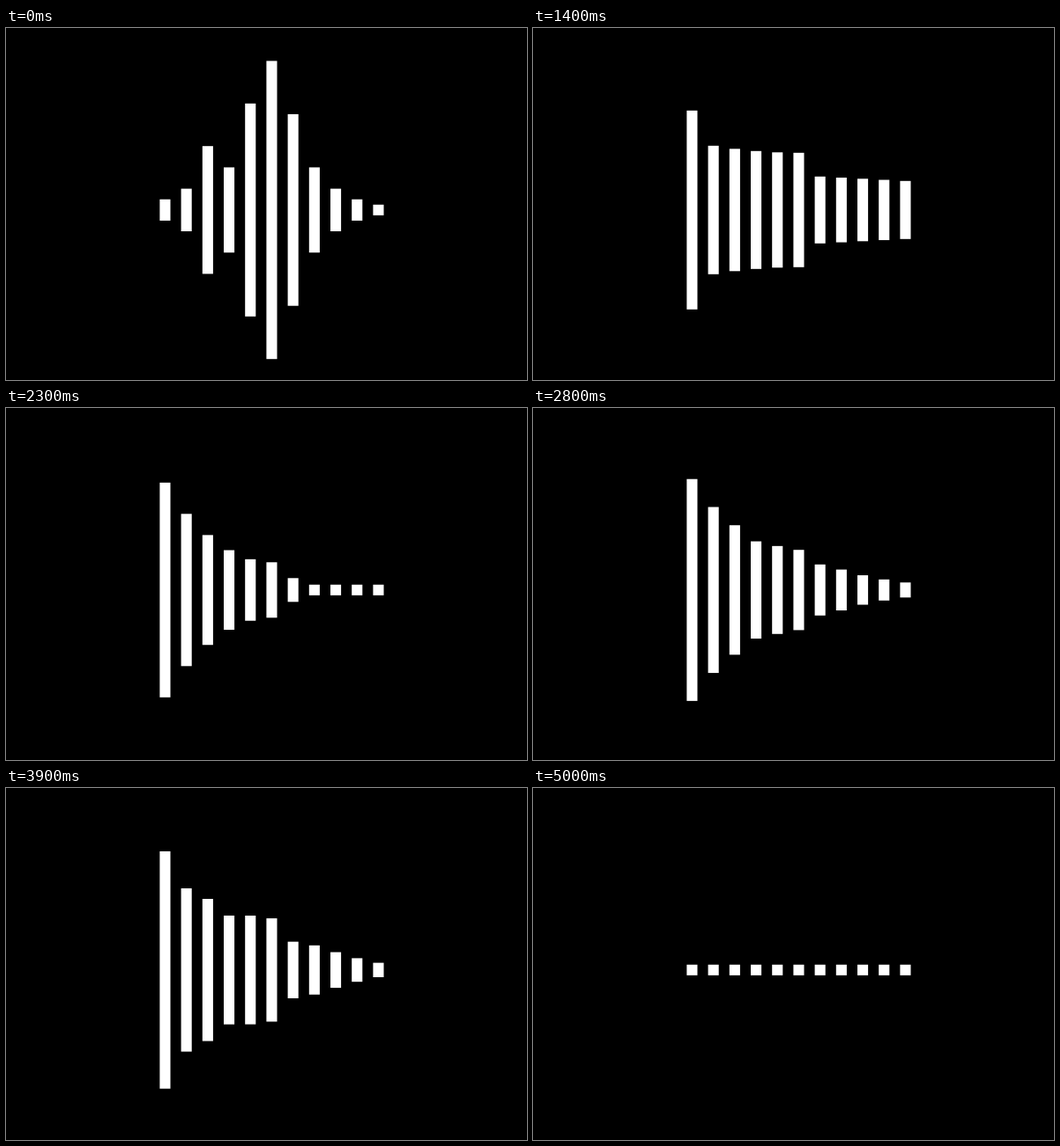
Write an HTML page with a canvas that moves like this. It is 591x400 px and loops after 5100 ms.

```html
<!DOCTYPE html>
<html lang="en">
<head>
<meta charset="utf-8">
<title>Equaliser bars</title>
<style>
  html, body { margin: 0; height: 100%; overflow: hidden; background: #000; }
  canvas { display: block; }
</style>
</head>
<body>
<canvas id="stage" width="591" height="400"></canvas>
<script>
const ctx = document.getElementById('stage').getContext('2d');
const LOOP = 5100, TICK = 100;
const UNIT = 12.1, LEFT = 174.4, MIDDLE = 206.8;
const START = 2, RELEASE = 45, FALL = 51.5;

// Resting shape, in units
const REST = [2, 4, 12, 8, 20, 28, 18, 8, 4, 2, 1];

// Spectrum at a tick: height of bars 0, 1, 5, 6 and 10
const KEYS = [
  { tick: START, spectrum: [190, 140, 88, 58, 24] },
  { tick: 6, spectrum: [226, 158, 113, 77, 36] },
  { tick: 14, spectrum: [226, 146, 130, 76, 66] },
  { tick: 23, spectrum: [244, 173, 63, 27, -33] },
  { tick: 34, spectrum: [214, 204, 124, 102, 20] },
  { tick: 37, spectrum: [281, 195, 120, 75, 18] },
  { tick: 43, spectrum: [216, 161, 106, 52, 6] },
  { tick: RELEASE, spectrum: [247, 180, 110, 50, 6] }
];

const mix = (a, b, u) => a + (b - a) * u;

// Bass stands alone, mids fall in a curve, treble in a straight line
function level([bass, low, mid, high, end], bar) {
  if (bar === 0) return bass;
  if (bar < 6) return mix(mid, low, ((5 - bar) / 4) ** 2);
  return Math.max(UNIT, mix(high, end, (bar - 6) / 4));
}

function height(bar, tick) {
  if (tick < START) return REST[bar] * UNIT;
  const next = Math.max(1, KEYS.findIndex(k => k.tick >= Math.min(tick, RELEASE)));
  const a = KEYS[next - 1], b = KEYS[next];
  const span = b.tick - a.tick;
  const u = Math.min(1, (tick - a.tick) / span);
  const swell = Math.sin(Math.PI * u);
  const jitter = Math.sin(tick * 1.9 + bar * 2.3) + Math.sin(tick * 0.8 + bar * 4.1);
  let h = mix(level(a.spectrum, bar), level(b.spectrum, bar), u);
  h += swell * (bar ? 0.07 * jitter * h : 2 * span);
  return Math.max(UNIT, h - FALL * Math.max(0, tick - RELEASE));
}

function draw(now) {
  const tick = Math.floor((now % LOOP) / TICK);
  ctx.fillStyle = '#000';
  ctx.fillRect(0, 0, 591, 400);
  ctx.fillStyle = '#fff';
  for (let bar = 0; bar < REST.length; bar++) {
    const h = height(bar, tick);
    ctx.fillRect(LEFT + bar * 2 * UNIT, MIDDLE - h / 2, UNIT, h);
  }
  requestAnimationFrame(draw);
}
draw(performance.now());
</script>
</body>
</html>
```
